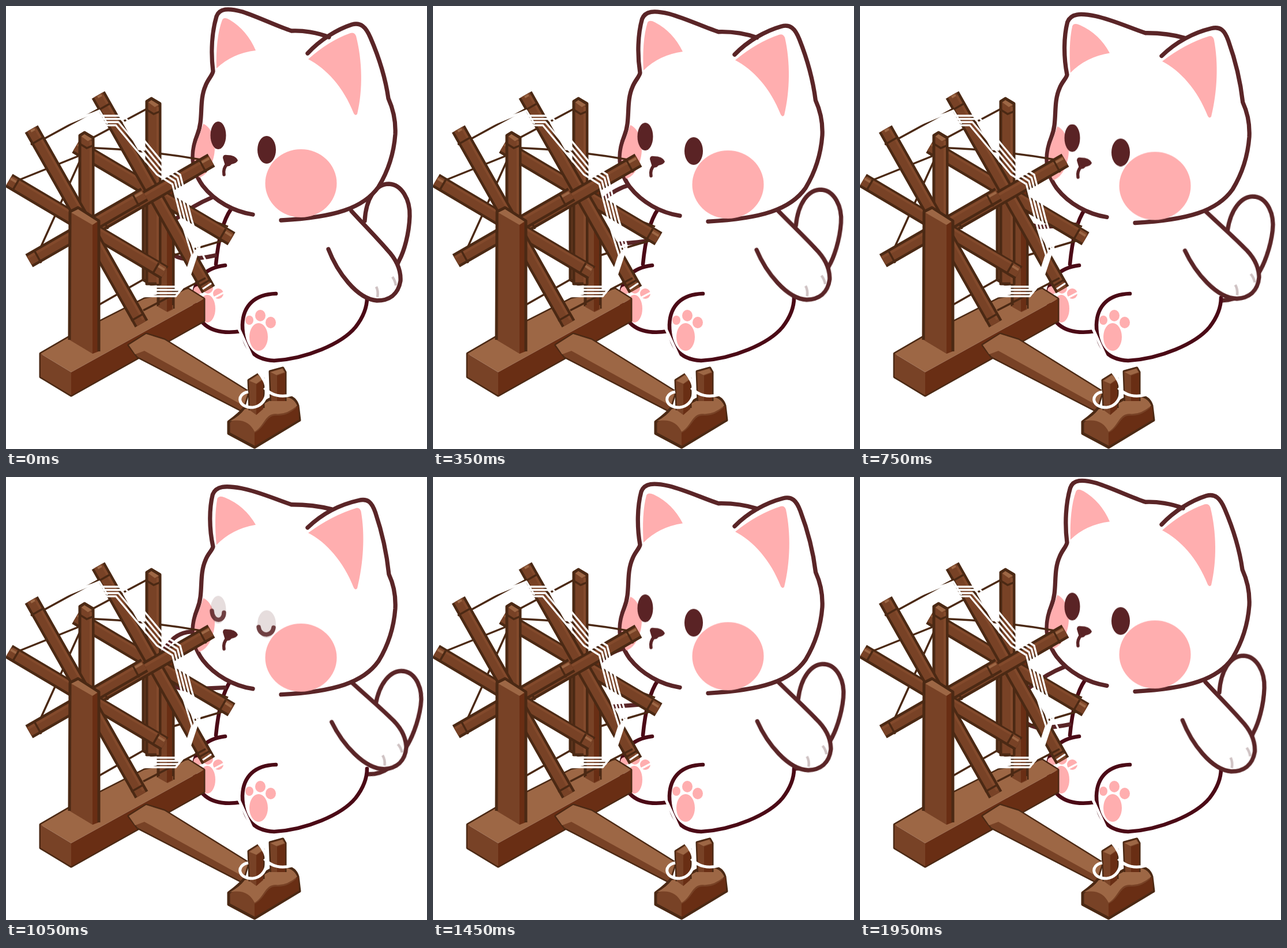
Write an HTML page without scripts that moves like this. It is 730x767 px and loops after 2 s.

```html
<!DOCTYPE html>
<html lang="en">
<head>
<meta charset="utf-8">
<title>Cat at the spinning wheel</title>
<style>
html, body { margin: 0; width: 100%; height: 100%; overflow: hidden; background: #fff; }
svg { display: block; width: 100%; height: 100%; }
.ink { fill: #fff; stroke: #5a2527; stroke-width: 7.3; stroke-linecap: round; stroke-linejoin: round; }
.body { stroke: #4b0a16; stroke-width: 6.6; }
.pink { fill: #ffaeaf; }
.eye { fill: #5a2325; }
.lid { fill: none; stroke: #5a2325; stroke-width: 7.5; stroke-linecap: round; }
.edge { fill: none; stroke: #4b2914; stroke-width: 5; stroke-linejoin: round; }
.light { fill: #9d6745; }
.mid { fill: #784226; }
.dark { fill: #692e14; }
.rim { stroke: #4b2914; stroke-width: 26; }
.core { stroke: #784226; stroke-width: 17; }
.shine { stroke: #834a2c; stroke-width: 4; }
.tip { stroke: #9d6745; stroke-width: 4; }
.band, .string { fill: none; stroke: #4b2914; stroke-width: 3.5; }
.yarn { fill: none; stroke: #fff; stroke-width: 3.3; stroke-linejoin: round; }

.move { animation: 2s steps(20) infinite; }
.head { animation-name: head; }
.earL { animation-name: earL; }
.earR { animation-name: earR; }
.face { animation-name: face; }
.far { animation-name: far; }
.arm { animation-name: arm; transform-origin: 600px 356px; }
.tail { animation-name: tail; transform-origin: 424px 552px; }
.open { animation: open 2s linear infinite; }
.shut { animation: shut 2s linear infinite; }

@keyframes head {
  0%, 100% { d: path("M428,361 C395,356 362,338 341,311 C320,282 320,252 332,222 C343,195 334,165 346,138 C350,127 358,120 359,113 C355,80 357,45 365,18 C370,4 385,3 410,10 C440,20 470,35 495,43 C515,42 540,46 560,54 M523,82 C545,58 575,40 600,32 C615,28 624,36 632,55 C648,92 658,125 663,160 C672,180 676,200 675,222 C672,262 660,290 646,313 C620,350 570,366 477,371"); }
  50% { d: path("M428,367 C395,362 362,344 341,317 C320,288 320,258 332,228 C343,201 334,171 346,144 C350,133 358,127 359,121 C352,90 352,55 358,31 C364,16 380,15 408,20 C440,26 470,40 495,48 C520,48 545,51 565,56 M523,88 C548,64 580,48 612,41 C628,37 635,44 641,62 C653,98 660,130 664,169 C672,186 676,206 675,228 C672,268 660,296 646,319 C620,356 570,372 477,377"); }
}
@keyframes earL {
  0%, 100% { d: path("M375,24 Q378,18 388,24 Q418,42 433,77 Q392,82 365,108 C364,75 367,45 375,24"); }
  50% { d: path("M366,38 Q369,32 379,36 Q414,50 433,83 Q392,90 365,118 C362,90 362,60 366,38"); }
}
@keyframes earR {
  0%, 100% { d: path("M524,92 Q560,60 597,47 Q604,45 607,52 C618,95 619,145 609,187 Q606,191 603,186 C585,140 555,108 524,92"); }
  50% { d: path("M524,97 Q565,67 608,54 Q614,53 616,60 C623,100 620,150 609,193 Q606,197 603,192 C585,146 555,113 524,97"); }
}
@keyframes far {
  0%, 100% { d: path("M356,332 Q325,345 298,366 C266,386 268,434 312,438 Q340,437 362,432"); }
  50% { d: path("M326,264 Q296,264 283,283 C258,306 262,358 312,364 Q345,362 380,361"); }
}
@keyframes face { 50% { transform: translateY(6px); } }
@keyframes arm { 50% { transform: rotate(-5.2deg); } }
@keyframes tail { 50% { transform: rotate(6.7deg); } }
@keyframes open { 0%, 40%, 61%, 100% { opacity: 1; } 48%, 51% { opacity: 0; } }
@keyframes shut { 0%, 40%, 61%, 100% { opacity: 0; } 48%, 51% { opacity: 1; } }
</style>
</head>
<body>
<svg viewBox="0 0 730 767">
  <defs>
    <path id="s2" d="M5,302 L275,462"/>
    <path id="s3" d="M44,213 L235,550"/>
    <path id="s4" d="M40,441 L240,326"/>
    <g id="wheel" fill="none">
      <path class="edge" d="M128,224 L136,219 L151,228 V540 H128 Z" style="fill:#784226"/>
      <path class="shine" d="M147,234 V540"/>
      <path class="light" d="M131,226 L136,222 L149,230 L142,234 Z"/>
      <path class="band" d="M127,238 L140,246 L152,241"/>

      <use href="#s2" class="rim"/><use href="#s2" class="core"/>
      <path class="shine" d="M11,297 L277,454"/>
      <path class="tip" d="M8,299 L20,306 M264,450 L275,457"/>
      <path class="band" d="M22,301 l-11,19 M265,445 l-11,19"/>

      <use href="#s3" class="rim"/><use href="#s3" class="core"/>
      <path class="shine" d="M52,214 L238,543"/>
      <path class="tip" d="M43,217 L50,213"/>
      <path class="band" d="M64,228 l-21,12 M238,533 l-21,12"/>

      <use href="#s4" class="rim"/><use href="#s4" class="core"/>
      <path class="shine" d="M39,435 L236,322"/>
      <path class="tip" d="M220,332 L236,323"/>
      <path class="band" d="M50,425 l11,20 M220,327 l11,20"/>
    </g>
    <path id="y" d="M154,190 L204,190 L275,275 L302,292 L322,370 L336,415 L316,475 L308,486 L248,486"/>
  </defs>

  <!-- cat -->
  <path class="ink move tail" d="M622,372 C624,335 640,308 664,308 C686,309 701,335 700,364 C699,395 690,425 682,440 C670,470 650,490 624,492"/>
  <g class="ink body">
    <path d="M390,352 C376,372 368,405 364,447 L410,558 C408,530 418,500 468,498 L626,505 L600,352" stroke="none"/>
    <path d="M390,352 C376,372 368,405 364,447" fill="none"/>
    <path d="M380,449 C345,453 325,475 326,505 C327,545 350,572 408,563"/>
    <path d="M468,498 C432,499 411,518 410,552 C410,585 424,612 465,614 C520,611 582,585 606,556 C620,538 626,520 626,505"/>
  </g>
  <g class="pink">
    <ellipse cx="333" cy="492" rx="8" ry="7"/>
    <ellipse cx="350" cy="488" rx="9" ry="10"/>
    <ellipse cx="368" cy="498" rx="9" ry="9"/>
    <ellipse cx="349" cy="524" rx="14" ry="24"/>
    <ellipse cx="422" cy="544" rx="7" ry="8"/>
    <ellipse cx="441" cy="536" rx="9" ry="10"/>
    <ellipse cx="459" cy="548" rx="9" ry="10"/>
    <ellipse cx="438" cy="573" rx="16" ry="24"/>
  </g>
  <path class="ink move far" d="M356,332 Q325,345 298,366 C266,386 268,434 312,438 Q340,437 362,432"/>
  <g class="move arm">
    <path class="ink" d="M599,355 C620,378 642,400 661,422 C678,440 685,458 684,476 C680,500 664,510 643,510 C608,507 574,460 559,421"/>
    <path d="M642,486 Q646,494 644,504 M670,469 Q675,476 676,484" fill="none" stroke="#cfc2c3" stroke-width="4.5"/>
  </g>
  <path class="ink move head" d="M428,361 C395,356 362,338 341,311 C320,282 320,252 332,222 C343,195 334,165 346,138 C350,127 358,120 359,113 C355,80 357,45 365,18 C370,4 385,3 410,10 C440,20 470,35 495,43 C515,42 540,46 560,54 M523,82 C545,58 575,40 600,32 C615,28 624,36 632,55 C648,92 658,125 663,160 C672,180 676,200 675,222 C672,262 660,290 646,313 C620,350 570,366 477,371"/>
  <path class="pink move earL" d="M375,24 Q378,18 388,24 Q418,42 433,77 Q392,82 365,108 C364,75 367,45 375,24"/>
  <path class="pink move earR" d="M524,92 Q560,60 597,47 Q604,45 607,52 C618,95 619,145 609,187 Q606,191 603,186 C585,140 555,108 524,92"/>
  <g class="move face">
    <path class="pink" d="M342,204 C358,210 366,238 360,262 C355,283 345,294 335,297 C325,280 323,250 335,225 Z"/>
    <ellipse class="pink" cx="511.5" cy="307" rx="62" ry="59"/>
    <g class="eye open">
      <ellipse cx="368" cy="224" rx="13.5" ry="24"/>
      <ellipse cx="452" cy="249" rx="16" ry="24"/>
    </g>
    <path class="lid shut" d="M357,226 C358,246 378,246 378,229 M438,254 C440,271 462,271 464,255"/>
    <path class="eye" d="M376,263 Q376,257 383,258 Q398,258 402,267 Q401,272 391,274 Q386,280 380,276 Q378,270 376,263"/>
    <path d="M384,273 Q376,281 378,292" fill="none" stroke="#5a2325" stroke-width="5.5" stroke-linecap="round"/>
  </g>

  <!-- spinning wheel -->
  <path class="string" d="M55,236 L165,176 M145,231 L250,175 M18,303 L125,260 M60,418 L130,264 M132,245 Q240,248 350,268 M235,345 Q310,352 385,382"/>
  <path class="string" d="M262,440 L390,402 M160,518 L255,464"/>
  <path class="edge" d="M60,602 L110,573 L240,507 L316,490 L343,507 V545 L113,674 L60,642 Z"/>
  <path class="light" d="M60,602 L110,573 L240,507 L316,490 L343,507 L113,634 Z"/>
  <path class="mid" d="M60,602 L113,634 V674 L60,642 Z"/>
  <path class="dark" d="M113,634 L343,507 V545 L113,674 Z"/>
  <path class="edge" d="M238,330 H266 V480 L252,482 L238,474 Z" style="fill:#784226"/>
  <path class="edge" d="M264,520 V316 H290 V524" style="fill:#784226"/>
  <path class="mid" d="M264,518 H290 V525 L280,530 L264,521 Z"/>
  <path class="dark" d="M279,318 H288 V525 L279,529 Z"/>
  <use href="#wheel" x="116" y="-59"/>
  <path class="string" d="M238,527 L346,471"/>
  <use href="#wheel"/>
  <path class="mid" d="M111,356 L125,349 L161,372 V598 L150,602 L110,578 Z"/>
  <path class="light" d="M112,357 L125,350 L160,372 L150,379 Z"/>
  <path class="dark" d="M150,379 L160,373 V598 L150,602 Z"/>
  <path class="edge" d="M110,578 L111,356 L125,349 L161,372 V598"/>

  <!-- treadle -->
  <path class="edge" d="M213,587 L243,568 L275,578 L420,668 L410,701 L228,607 Z"/>
  <path class="mid" d="M213,587 L243,568 L275,578 L420,668 L410,701 L228,607 Z"/>
  <path class="light" d="M213,587 L243,568 L275,578 L420,668 L412,692 L240,597 L224,603 Z"/>
  <path class="edge" d="M386,720 Q405,706 413,696 Q440,692 455,682 C475,670 500,672 506,692 L509,717 L431,764 L386,740 Z" style="fill:#784226"/>
  <path class="dark" d="M431,739 C452,728 450,708 470,709 Q490,710 507,692 L508,716 L431,762 Z"/>
  <path class="light" d="M388,719 Q405,710 414,698 Q440,694 456,684 C475,672 498,674 505,692 Q486,708 468,706 C448,706 448,728 431,737 C424,722 410,714 388,719"/>
  <path class="edge" d="M423,700 L421,648 L437,638 L446,645 V696"/>
  <path class="edge" d="M460,684 L458,633 L480,627 L484,634 V684"/>
  <path class="mid" d="M421,648 L437,638 L446,645 V698 L434,708 L423,700 Z M458,633 L480,627 L484,634 V684 H460 Z"/>
  <path class="dark" d="M434,655 L446,647 V697 L434,708 Z M470,640 L484,635 V684 H470 Z"/>
  <path class="light" d="M422,649 L437,639 L445,646 L434,654 Z M459,634 L479,628 L483,634 L469,639 Z"/>

  <!-- yarn -->
  <g class="yarn">
    <use href="#y"/>
    <use href="#y" x="-4.5" y="5.5"/>
    <use href="#y" x="-9" y="11"/>
    <use href="#y" x="-13.5" y="16.5"/>
    <path d="M106,204 L162,181 L176,204 M112,198 L156,184 M332,412 L352,452 M341,490 L356,480 M359,506 L378,496"/>
    <path d="M403,557 L426,607" stroke-width="5"/>
    <path d="M420,668 C398,672 402,696 428,695 C452,692 462,662 438,634 M448,661 C460,675 478,678 495,673" stroke-width="5"/>
  </g>
</svg>
</body>
</html>
```
